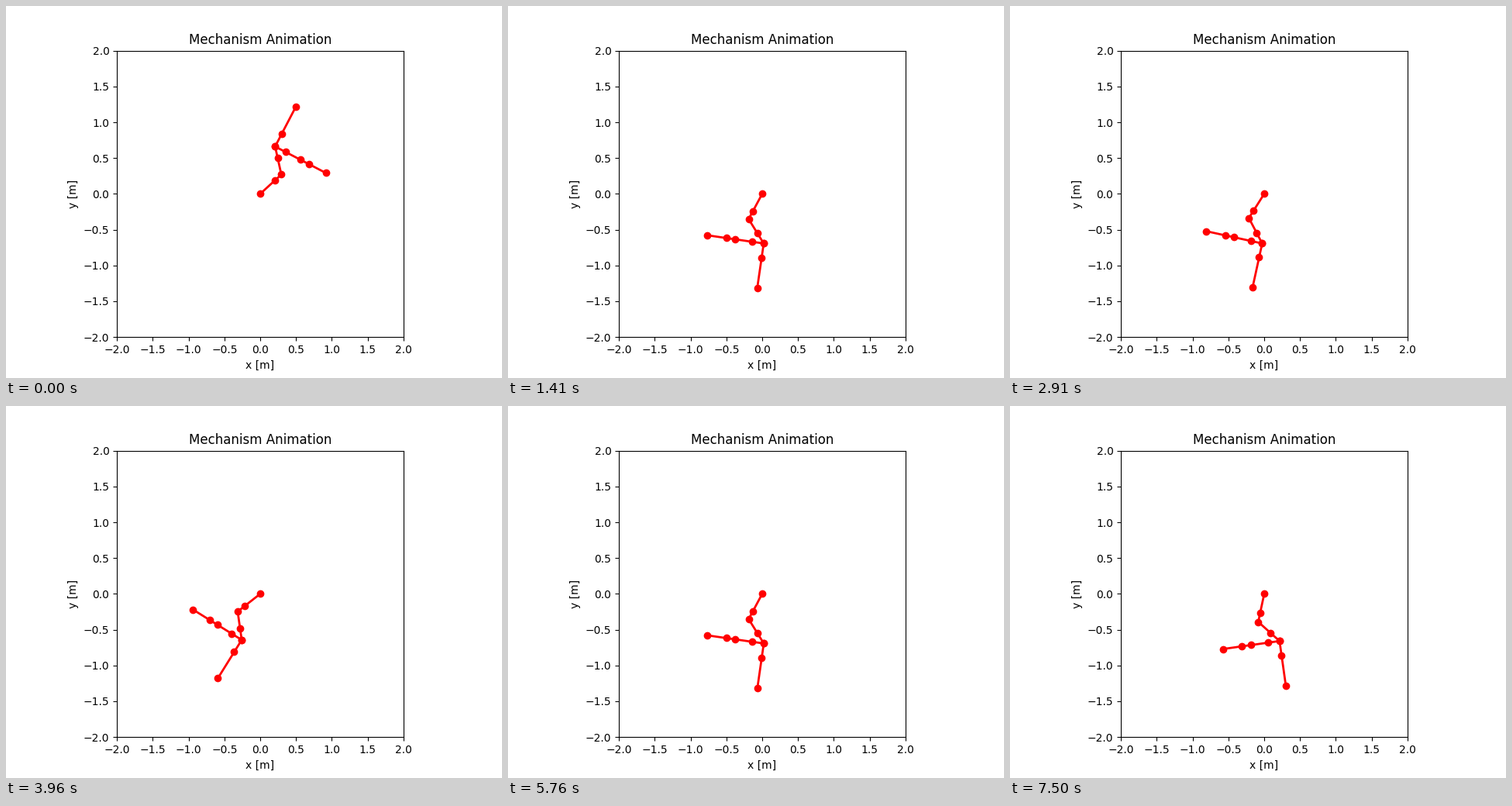
A matplotlib script that plays this animation: 640x480 px, repeating every 7530 ms.

```python
import numpy as np
import matplotlib.pyplot as plt
from matplotlib.animation import FuncAnimation

FRAMES, INTERVAL, SUBSTEPS = 251, 30, 10

# Damped swing of the locked linkage about its rest angle
REST = np.radians(-80.9 - 30)
START = np.radians(42.5)
SPEED = -1.3
OMEGA2 = 4.452 ** 2
DAMPING = 0.66


def slope(s):
    return np.array([s[1], -OMEGA2 * np.sin(s[0] - REST) - DAMPING * s[1]])


def swing():
    """Angle of the first link at every frame (RK4)."""
    h = INTERVAL / 1000 / SUBSTEPS
    s = np.array([START, SPEED])
    angles = []
    for _ in range(FRAMES):
        angles.append(s[0])
        for _ in range(SUBSTEPS):
            k1 = slope(s)
            k2 = slope(s + h / 2 * k1)
            k3 = slope(s + h / 2 * k2)
            k4 = slope(s + h * k3)
            s = s + h / 6 * (k1 + 2 * k2 + 2 * k3 + k4)
    return angles


def along(base, angle, dists):
    """Points on a ray from base, as complex numbers."""
    return [base + d * np.exp(1j * np.radians(angle)) for d in dists]


# Body shape with the first link on the x axis
lower = along(0, 0, [0, 0.275, 0.4])
middle = along(lower[-1], 60, [0.233, 0.4])
hub = middle[-1]
TRUNK = np.array(lower + middle + along(hub, 20, [0.2, 0.63]))
BRANCH = np.array(along(hub, -70, [0, 0.163, 0.4, 0.528, 0.8]))
ANGLES = swing()

fig, ax = plt.subplots(figsize=(6.4, 4.8), dpi=100)
ax.set_xlim(-2, 2)
ax.set_ylim(-2, 2)
ax.set_aspect("equal")
ax.set_title("Mechanism Animation")
ax.set_xlabel("x [m]")
ax.set_ylabel("y [m]")
lines = [ax.plot([], [], "ro-", lw=2)[0] for _ in range(2)]


def update(i):
    turn = np.exp(1j * ANGLES[i])
    for line, shape in zip(lines, (TRUNK, BRANCH)):
        pts = shape * turn
        line.set_data(pts.real, pts.imag)
    return lines


anim = FuncAnimation(fig, update, frames=FRAMES, interval=INTERVAL,
                     repeat=True, repeat_delay=0)
plt.show()
```
